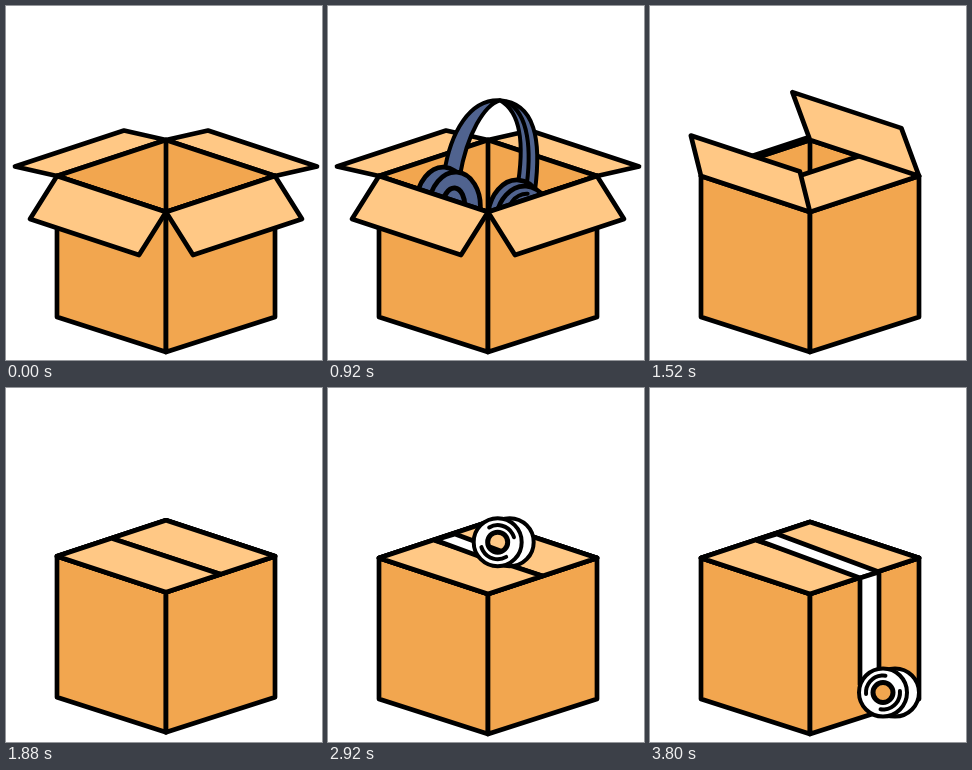
An HTML page with a canvas that plays this animation: 316x354 px, repeating every 3.84 s.

```html
<!DOCTYPE html>
<html lang="en">
<head>
<meta charset="utf-8">
<title>Packing a box</title>
<style>
  html, body { margin: 0; width: 100%; height: 100%; overflow: hidden; background: #fff; }
  canvas { display: block; width: 316px; height: 354px; }
</style>
</head>
<body>
<canvas id="stage" width="316" height="354"></canvas>
<script>
const ctx = document.getElementById('stage').getContext('2d');
const LOOP = 3840, STEP = 40;
const ORANGE = '#f2a64f', PEACH = '#ffc885', BLUE = '#50638f', INK = '#000', WHITE = '#fff';

// Corners of the box: top rhombus and bottom edge
const L = [51, 170], B = [160, 134], R = [269, 170], F = [160, 206];
const LOW_L = [51, 311], LOW_F = [160, 346], LOW_R = [269, 311];

// Progress of t through a time span, 0 to 1
const span = (t, from, to) => Math.min(1, Math.max(0, (t - from) / (to - from)));
const smooth = k => k * k * (3 - 2 * k);
const mix = (a, b, k) => a + (b - a) * k;
const between = (p, q, k) => [mix(p[0], q[0], k), mix(p[1], q[1], k)];

function paint(fill, width = 4.7) {
  if (fill) { ctx.fillStyle = fill; ctx.fill(); }
  ctx.lineWidth = width;
  ctx.strokeStyle = INK;
  ctx.stroke();
}

function trace(points) {
  ctx.beginPath();
  points.forEach(p => ctx.lineTo(...p));
  ctx.closePath();
}

function poly(points, fill) {
  trace(points);
  paint(fill);
}

function ellipse(x, y, rx, ry, fill, width) {
  ctx.beginPath();
  ctx.ellipse(x, y, rx, ry, 0, 0, 7);
  paint(fill, width);
}

function shape(d, fill) {
  const path = new Path2D(d);
  if (fill) { ctx.fillStyle = fill; ctx.fill(path); }
  ctx.lineWidth = 4;
  ctx.strokeStyle = INK;
  ctx.stroke(path);
}

// The free edge swings on a curve from open, past upright, to closed.
// Right-hand flaps mirror the left-hand ones.
const FRONT = { open: [-27, 43], over: [-76, -84], shut: [54.5, -18], hinge: F };
const BACK = { open: [-42, -9.5], over: [10, -110], shut: [54.5, 18], hinge: B };

function flap(kind, side, k) {
  const rise = between(kind.open, kind.over, k);
  const fall = between(kind.over, kind.shut, k);
  const [x, y] = between(rise, fall, k);
  const a = side > 0 ? L : R, b = kind.hinge;
  return {
    foldedIn: x > 0,
    draw: () => poly([a, b, [b[0] + x * side, b[1] + y], [a[0] + x * side, a[1] + y]], PEACH)
  };
}

function headphones(t) {
  const fall = 1 - (1 - span(t, 240, 1590)) ** 2;
  const lean = smooth(span(t, 640, 1240));
  ctx.save();
  // Hide whatever has sunk below the front rim
  trace([[0, 0], [316, 0], [316, 170], R, F, L, [0, 170]]);
  ctx.clip();
  ctx.translate(157 + 31 * lean, mix(-160, 176, fall));
  ctx.rotate(lean * Math.PI / 18);
  ctx.translate(-157, -10);

  // Band
  shape('M108 90C111 46 128 12 158 11C143 17 128 46 124 90Z', BLUE);
  shape('M158 11C193 11 203 46 200 100L182 100C186 58 182 22 158 11Z', BLUE);
  shape('M165 12C188 22 194 58 191 100');

  // Left cup, pad side
  ellipse(108, 120, 26, 38, BLUE);
  ellipse(121, 122, 26, 36, BLUE);
  ellipse(120, 122, 11.5, 20, null, 5);

  // Right cup, outer side
  ellipse(183, 127, 28, 38, BLUE);
  ellipse(191, 130, 27.5, 35.5, BLUE);
  shape('M193 102C167 103 166 156 191 159');
  ctx.restore();
}

function box(t) {
  const swing = (from, to) => smooth(span(t, from, to));
  const backLeft = flap(BACK, 1, swing(1160, 1640));
  const frontRight = flap(FRONT, -1, swing(1120, 1640));
  const backRight = flap(BACK, -1, swing(1180, 1780));
  const frontLeft = flap(FRONT, 1, swing(1120, 1760));

  for (const f of [backLeft, backRight]) if (!f.foldedIn) f.draw();
  poly([L, B, R, F], ORANGE);
  poly([B, F]);
  headphones(t);
  poly([L, F, LOW_F, LOW_L], ORANGE);
  poly([F, R, LOW_R, LOW_F], ORANGE);
  if (backLeft.foldedIn) backLeft.draw();
  frontRight.draw();
  if (backRight.foldedIn) backRight.draw();
  frontLeft.draw();
}

// The roll crosses the lid, then runs down the right face
const START = [106, 126], EDGE = [227, 179.5], END = [233, 304.5];

function tape(x, y) {
  const k = span(x, START[0], 208);
  if (!k) return;
  const far = [107, 152], near = [127, 146], left = [210, 190], right = [229, 184];
  poly([far, near, between(near, right, k), between(far, left, k)], WHITE);
  const low = y - 14;
  if (low > left[1]) poly([left, right, [right[0], low], [left[0], low + 6]], WHITE);
}

function roll(x, y, turn, alpha) {
  ctx.save();
  ctx.globalAlpha = alpha;
  ctx.translate(x, y);

  // The core is open, so the box shows through it
  ctx.save();
  ctx.beginPath();
  ctx.rect(-40, -40, 90, 80);
  ctx.arc(0, 0, 9, 0, 7);
  ctx.clip('evenodd');
  ellipse(12, 0, 24, 24, WHITE, 4);
  ellipse(0, 0, 24, 24, WHITE, 4);
  ctx.restore();

  ellipse(0, 0, 10, 10, null, 5);
  ctx.rotate(turn);
  for (const mid of [0, Math.PI]) {
    ctx.beginPath();
    ctx.arc(0, 0, 17, mid - 0.9, mid + 0.9);
    paint(null, 4);
  }
  ctx.restore();
}

function taping(t) {
  const across = span(t, 2520, 3280), down = span(t, 3280, 3800);
  const [x, y] = down ? between(EDGE, END, down) : between(START, EDGE, across);
  tape(x, y);
  roll(x, y, 3.7 * across + 3.4 * down, span(t, 2280, 2480));
}

function draw(t) {
  ctx.fillStyle = WHITE;
  ctx.fillRect(0, 0, 316, 354);
  ctx.lineJoin = ctx.lineCap = 'round';

  ctx.save();
  ctx.translate(0, -1.7 * Math.sin(Math.PI * span(t, 1760, 2000)));
  box(t);
  ctx.restore();
  if (t > 2280) taping(t);
}

const start = performance.now();
function tick() {
  const t = (performance.now() - start) % LOOP;
  draw(Math.floor(t / STEP) * STEP);
  requestAnimationFrame(tick);
}
tick();
</script>
</body>
</html>
```
